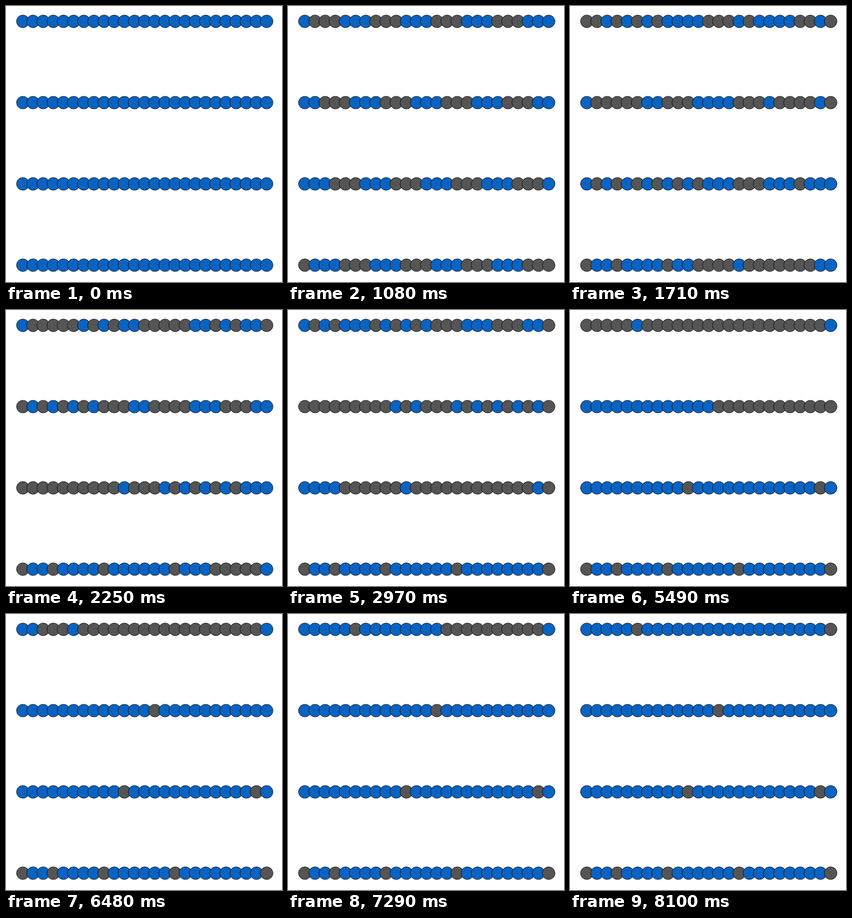
Write an HTML page that moves like this. It is 480 px wide and 480 px high and loops after 9090 ms.

```html
<!DOCTYPE html>
<html lang="en">
<head>
<meta charset="utf-8">
<title>Hundred lockers</title>
<style>
html, body { margin: 0; width: 100%; height: 100%; overflow: hidden; background: #fff; }
svg { display: block; width: 100vw; height: 100vh; }
circle { stroke: #000; stroke-width: 0.75; }
</style>
</head>
<body>
<svg id="stage" viewBox="0 0 480 480"></svg>
<script>
const TICK = 90, TICKS = 101, HOLD = 10, STEPS = 80;
const COUNT = 100, COLS = 25, PITCH = 17.667;
const CLOSED = '#0a63c1', OPEN = '#555555';
const stage = document.getElementById('stage');

// Locker 1 is at the bottom left; rows fill upwards.
const lockers = Array.from({ length: COUNT }, (_, i) => {
  const c = document.createElementNS('http://www.w3.org/2000/svg', 'circle');
  c.setAttribute('cx', 29.3 + PITCH * (i % COLS));
  c.setAttribute('cy', 450.7 - 8 * PITCH * Math.floor(i / COLS));
  c.setAttribute('r', 11);
  stage.appendChild(c);
  return c;
});

// Nearest whole number, halves going to the odd neighbour.
function roundOdd(x) {
  const r = Math.round(x);
  return x % 1 === 0.5 && r % 2 === 0 ? r - 1 : r;
}

// Pass k toggles every k-th locker.
function isOpen(n, passes) {
  let open = false;
  for (let k = 1; k <= Math.min(n, passes); k++) {
    if (n % k === 0) open = !open;
  }
  return open;
}

let shown = -1;
function render(ms) {
  const tick = Math.floor(ms / TICK) % TICKS;
  const step = Math.min(STEPS, Math.max(0, tick - HOLD));
  const passes = roundOdd(step * COUNT / STEPS);
  if (passes === shown) return;
  shown = passes;
  lockers.forEach((c, i) => c.setAttribute('fill', isOpen(i + 1, passes) ? OPEN : CLOSED));
}

render(0);
const start = performance.now();
function loop() {
  render(performance.now() - start);
  requestAnimationFrame(loop);
}
requestAnimationFrame(loop);
</script>
</body>
</html>
```
